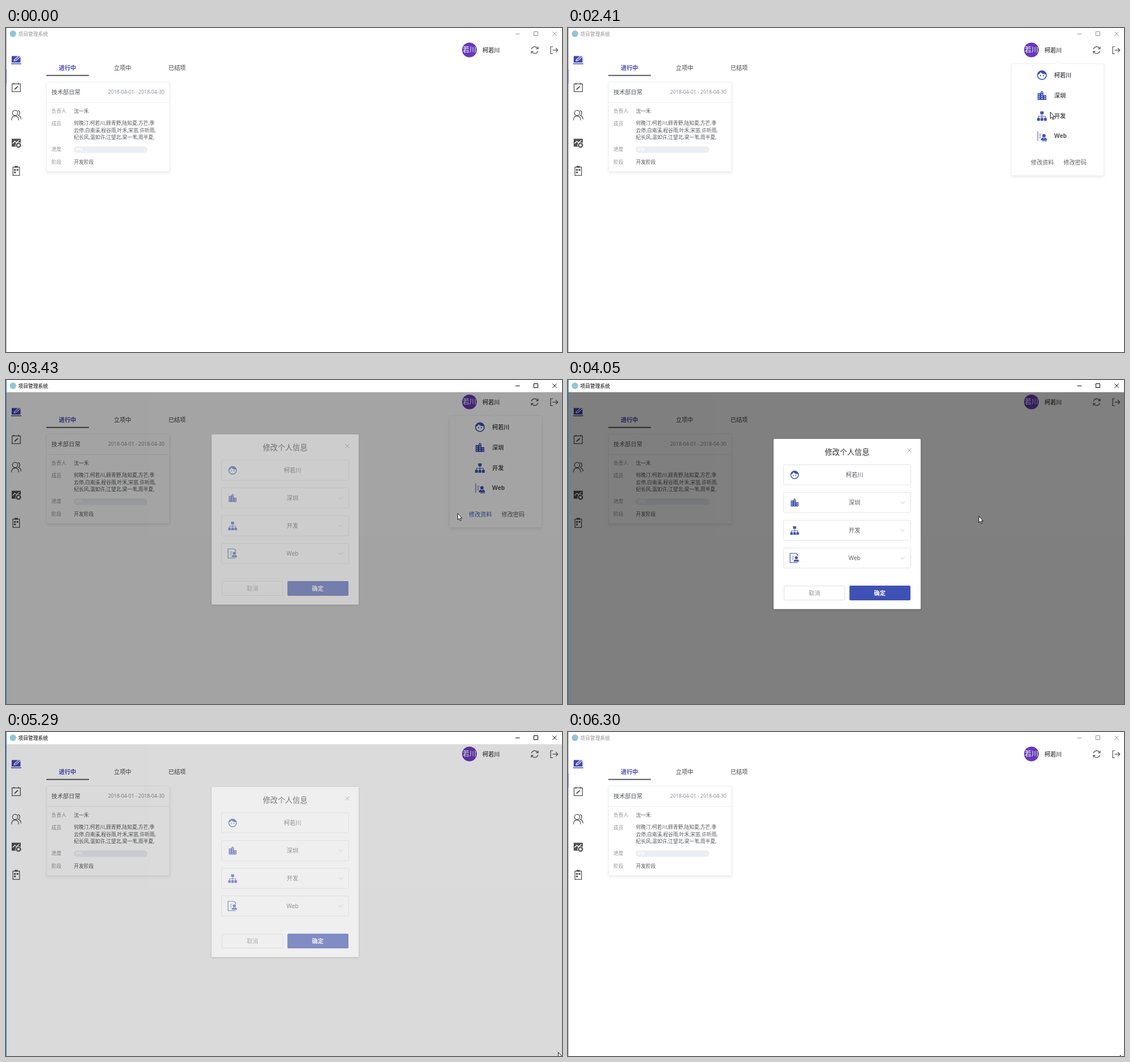
An HTML page for the animation above (6.77 s loop, 979 px wide and 572 px high).

```html
<!DOCTYPE html>
<html lang="zh-CN">
<head>
<meta charset="utf-8">
<title>项目管理系统</title>
<style>
html, body { margin: 0; width: 100%; height: 100%; overflow: hidden; background: #fff; }
svg { display: block; }
text { font: 8.75px 'Open Sans', 'Noto Sans CJK SC', 'Noto Sans CJK', sans-serif; fill: #55575b; }
.md { font-size: 10.2px; }
.lg { font-size: 13.1px; fill: #303133; }
.b { font-weight: 700; }
.mid { text-anchor: middle; }
.label { fill: #909399; }
.line { fill: none; stroke: currentColor; }
.card { fill: #fff; stroke: #eef0f4; filter: drop-shadow(.5px 2px 2px rgba(0,0,0,.08)); }
.box { fill: none; stroke: #e1e4ea; }
.blue { color: #3f51b5; fill: #3f51b5; }
.dark { color: #505053; }

/* One loop; values hold between keyframes unless a keyframe sets steps() */
.anim { animation: 6.77s step-end -5ms infinite; }
#bar { animation-name: bar; }
#edge { animation-name: edge; }
#name { animation-name: name; }
#hover { animation-name: hover; }
#popup { animation-name: popup; }
#link { animation-name: link; }
#veil { animation-name: veil; }
#dialog { animation-name: dialog; }
#cursor { animation-name: move; }
#arrow { animation-name: arrow; }
#hand { animation-name: hand; }

@keyframes bar { 0%, 93.058% { color: #939393; } 42.688% { color: #000; } }
@keyframes edge { 0%, 93.058% { opacity: 0; } 42.688% { opacity: 1; } }
@keyframes name { 0%, 27.474% { fill: #58595c; } 13.589% { fill: #3f51b5; } }
@keyframes hover { 0%, 27.474% { opacity: 0; } 13.589% { opacity: 1; } }
@keyframes link { 0%, 56.573% { fill: #606266; } 39.143% { fill: #4a5fc4; } }
@keyframes popup {
  0%, 56.573%, 100% { opacity: 0; }
  14.771% { opacity: .35; }
  15.805% { opacity: .75; }
  16.987% { opacity: 1; }
  54.21% { opacity: .8; }
  55.539% { opacity: .35; }
}
@keyframes veil {
  0%, 80.502%, 100% { opacity: 0; }
  50.665% { opacity: .36; }
  51.994% { opacity: .48; }
  53.176% { opacity: .5; }
  78.139% { opacity: .145; }
  79.468% { opacity: .02; }
}
@keyframes dialog {
  0%, 81.684%, 100% { opacity: 0; transform: translateY(-20px); }
  50.665% { opacity: .46; transform: translateY(-8px); }
  51.994% { opacity: .88; transform: translateY(-2.2px); }
  53.176% { opacity: .99; transform: translateY(-.3px); }
  54.21% { opacity: 1; transform: none; }
  78.139% { opacity: .57; transform: translateY(-7px); }
  79.468% { opacity: .17; transform: translateY(-16.6px); }
  80.502% { opacity: .04; transform: translateY(-19px); }
}
@keyframes move {
  0% { transform: translate(990px, 590px); }
  3.397% { transform: translate(893px, 560px); animation-timing-function: steps(2); }
  5.65% { transform: translate(775px, 440px); animation-timing-function: steps(2); }
  7.903% { transform: translate(704px, 270px); animation-timing-function: steps(2); }
  10.155% { transform: translate(735px, 130px); animation-timing-function: steps(2); }
  12.408% { transform: translate(803px, 62px); }
  13.589% { transform: translate(847px, 45px); }
  14.771% { transform: translate(859px, 42px); }
  15.805% { transform: translate(866px, 41px); }
  27.474% { transform: translate(864px, 60px); animation-timing-function: steps(2); }
  29.69% { transform: translate(855px, 120px); }
  35.598% { transform: translate(849px, 148px); animation-timing-function: steps(3); }
  39.143% { transform: translate(821px, 233px); }
  48.301% { transform: translate(817px, 233px); }
  49.631% { transform: translate(811px, 233px); }
  50.665% { transform: translate(795px, 235px); animation-timing-function: steps(5); }
  56.573% { transform: translate(733px, 240px); }
  58.641% { transform: translate(727px, 240px); }
  59.823% { transform: translate(723px, 240px); }
  63.22% { transform: translate(726px, 246px); animation-timing-function: steps(8); }
  72.23% { transform: translate(832px, 417px); }
  76.809% { transform: translate(905px, 495px); }
  78.139% { transform: translate(972px, 565px); }
  83.752% { transform: translate(972px, 568px); }
  84.934%, 100% { transform: translate(972px, 570px); }
}
@keyframes arrow { 0%, 27.474%, 42.688% { opacity: 1; } 13.589%, 39.143% { opacity: 0; } 100% { opacity: 1; } }
@keyframes hand { 0%, 27.474%, 42.688% { opacity: 0; } 13.589%, 39.143% { opacity: 1; } 100% { opacity: 0; } }
</style>
</head>
<body>
<svg width="979" height="572" viewBox="0 0 979 572">
  <defs>
    <g id="face" transform="scale(.85) translate(-12 -12)">
      <path fill-rule="evenodd" d="M12 2a10 10 0 1 0 0 20a10 10 0 1 0 0-20zm0 18c-4.41 0-8-3.59-8-8 0-.29.02-.58.05-.86 2.36-1.05 4.23-2.98 5.21-5.37C11.07 8.33 14.05 10 17.42 10c.78 0 1.53-.09 2.25-.26.21.71.33 1.47.33 2.26 0 4.41-3.59 8-8 8z"/>
      <circle cx="9" cy="13" r="1.25"/><circle cx="15" cy="13" r="1.25"/>
    </g>
    <path id="city" transform="scale(.85) translate(-12 -12)" d="M15 11V5l-3-3-3 3v2H3v14h18V11h-6zm-8 8H5v-2h2v2zm0-4H5v-2h2v2zm0-4H5V9h2v2zm6 8h-2v-2h2v2zm0-4h-2v-2h2v2zm0-4h-2V9h2v2zm0-4h-2V5h2v2zm6 12h-2v-2h2v2zm0-4h-2v-2h2v2z"/>
    <g id="tree">
      <path d="M-3-8h6v5h-6zM-8.5 3.500h5v5h-5zM-2.500 3.500h5v5h-5zM3.500 3.500h5v5h-5z"/>
      <path class="line" d="M0-3V4M-6 4V.5H6V4"/>
    </g>
    <g id="person">
      <circle cx="3.500" cy="-.8" r="3"/>
      <path d="M-2 7.200C-2 4 0 3 2 2.600L3.500 4.500 5 2.600C7 3 9 4 9 7.200z"/>
      <path class="line" stroke-width=".9" d="M-5-3.500h4M-5-.5h3.500M-5 2.500h3"/>
    </g>
    <path id="chev" class="line" d="M-3.800-2L0 1.800 3.800-2"/>
  </defs>

  <rect width="979" height="572" fill="#fff"/>

  <!-- Sidebar -->
  <g style="color:#4347b0;fill:#4347b0">
    <path d="M10 49.500h15.500V61H10zM9 62.500h18V64H9z"/>
    <path d="M13.500 59l1-3.600 8.500-7.400 3 2.800-8.500 7.200z" fill="#fff"/>
    <path d="M15 57.700l.7-1.800 7.600-6.700 1.300 1.300-7.600 6.500z"/>
  </g>
  <g class="dark line" stroke-width="1.250">
    <path d="M10.700 98.700h14.600v13.600H10.700zM14 96.500v3.500M22 96.500v3.500"/>
    <path d="M15 108.500l6-5.500" stroke-width="1.700"/>
    <circle cx="16" cy="150" r="4.600"/>
    <path d="M9.700 163c0-5 2.500-7.600 6.300-7.600s6.300 2.600 6.300 7.600M20.500 145.800c4.500.2 5.200 6 1.300 8.400 3 1.200 4.500 3.800 4.700 7"/>
    <path d="M12.200 245.700h11.600v14.600H12.200z"/>
  </g>
  <g fill="#505053">
    <path d="M10 195.500h16v14H10z"/>
    <path d="M11.500 204l4-4 3 2.500 5-4.500" fill="none" stroke="#fff" stroke-width="1.300"/>
    <circle cx="22" cy="207" r="5.500" fill="#fff"/>
    <circle cx="22" cy="207" r="3.200" fill="none" stroke="#505053" stroke-width="1.800"/>
    <circle cx="22" cy="207" r="4.400" fill="none" stroke="#505053" stroke-dasharray="1.800 1.650"/>
    <path d="M15 243.500h6v3h-6zM14.200 249h3v3h-3zM18.700 249h3v3h-3zM14.200 253.500h3v3h-3z"/>
  </g>

  <!-- Tabs -->
  <text class="md b" x="93" y="73.700" style="fill:#4347b0">进行中</text>
  <text class="md" x="190" y="73.700" style="fill:#404145">立项中</text>
  <text class="md" x="286" y="73.700" style="fill:#404145">已结项</text>
  <path fill="#58595c" d="M71 82.700h75v2H71z"/>

  <!-- Project card -->
  <rect class="card" x="71.500" y="95.500" width="216.500" height="158" rx="1.500"/>
  <path stroke="#ebeef5" d="M72 131.500h216"/>
  <text class="md" x="80" y="116.500">技术部日常</text>
  <text x="279" y="115.500" text-anchor="end" style="font-size:8.800px;fill:#85888d">2018-04-01 - 2018-04-30</text>
  <g>
    <text class="label" x="80" y="150.300">负责人</text><text x="119.500" y="150.300">沈一禾</text>
    <text class="label" x="80" y="172.300">成员</text>
    <text x="119.500" y="171.300">何晚汀,柯若川,顾青野,陆知夏,方芒,季</text>
    <text x="119.500" y="183.500">云停,白南溪,程谷雨,叶禾,宋苗,许听雨,</text>
    <text x="119.500" y="195.700">纪长风,温如许,江望北,梁一苇,周半夏,</text>
    <text class="label" x="80" y="217.300">进度</text>
    <rect x="119" y="209" width="130" height="11.500" rx="5.750" fill="#ebeef5"/>
    <text class="b" x="122.500" y="217.300" style="fill:#fff">0%</text>
    <text class="label" x="80" y="239.700">阶段</text><text x="119.500" y="239.700">开发阶段</text>
  </g>

  <!-- User header -->
  <rect id="hover" class="anim" x="830" y="25" width="53" height="28" fill="#fcfcfd"/>
  <circle cx="816" cy="38.800" r="13" fill="#673ab7"/>
  <text class="mid" x="816" y="43.200" style="font-size:12px;fill:#fff">若川</text>
  <text id="name" class="md b anim" x="839" y="42.800">柯若川</text>
  <g class="dark line" stroke-width="1.200">
    <path d="M925.300 37.500a6 6 0 0 1 11-1.300M936.700 40.500a6 6 0 0 1-11 1.300"/>
    <path d="M937 33v3.600h-3.600M925 45v-3.600h3.600"/>
    <path d="M963 33h-4v12.500h4M962.500 39.200h9M968 35.500l3.700 3.700-3.700 3.700"/>
  </g>

  <!-- Profile popover -->
  <g id="popup" class="anim">
    <rect class="card" x="781" y="63" width="162.500" height="197.500" rx="2"/>
    <path d="M857.500 63.500l4.500-4.500 4.500 4.500" fill="#fff" stroke="#eef0f4"/>
    <g class="blue">
      <use href="#face" x="834.500" y="83.300"/>
      <use href="#city" x="834.500" y="119.300"/>
      <use href="#tree" x="834.500" y="155.300"/>
      <use href="#person" x="834.500" y="191"/>
      <path class="line" d="M827 182.500v17M835 199.500h8"/>
    </g>
    <text class="md b" x="856" y="87">柯若川</text>
    <text class="md b" x="856" y="122.800">深圳</text>
    <text class="md b" x="856" y="158.700">开发</text>
    <text class="md b" x="856" y="194">Web</text>
    <text id="link" class="md anim" x="815" y="240.800">修改资料</text>
    <text class="md" x="872.500" y="240.800" style="fill:#606266">修改密码</text>
  </g>

  <rect id="veil" class="anim" x="1" y="21.500" width="978" height="551"/>

  <!-- Edit dialog -->
  <g id="dialog" class="anim">
    <rect x="362" y="104" width="259" height="300.500" rx="1.500" fill="#fff" style="filter:drop-shadow(0 1px 1.500px rgba(0,0,0,.3))"/>
    <text class="lg mid" x="491.500" y="131.700">修改个人信息</text>
    <path class="line" style="color:#909399" d="M597.500 121l7 7M604.500 121l-7 7"/>
    <rect class="box" x="379.500" y="149.500" width="224" height="35.500" rx="2"/>
    <rect class="box" x="379.500" y="198.500" width="224" height="35.500" rx="2"/>
    <rect class="box" x="379.500" y="247.500" width="224" height="35.500" rx="2"/>
    <rect class="box" x="379.500" y="296.500" width="224" height="35.500" rx="2"/>
    <g class="blue">
      <use href="#face" transform="translate(399 167.500) scale(.88)"/>
      <use href="#city" transform="translate(399 216.500) scale(.88)"/>
      <use href="#tree" transform="translate(399 265.500) scale(.9)"/>
      <use href="#person" transform="translate(399 314.500) scale(.88)"/>
      <path class="line" stroke-width="1.200" d="M404.500 311v-2.500l-3-2.500h-10.500v16.500h13.500"/>
    </g>
    <text class="md mid" x="504.500" y="171.300">柯若川</text>
    <text class="md mid" x="504.500" y="220.200">深圳</text>
    <text class="md mid" x="504.500" y="269.200">开发</text>
    <text class="md mid" x="504.500" y="317.800">Web</text>
    <g style="color:#c0c4cc">
      <use href="#chev" x="589" y="216.500"/>
      <use href="#chev" x="589" y="265.500"/>
      <use href="#chev" x="589" y="314.500"/>
    </g>
    <rect class="box" x="380.500" y="363.500" width="107" height="25" rx="2" style="stroke:#dcdfe6"/>
    <rect x="495.500" y="363" width="107.500" height="26" rx="2" fill="#3f51b5"/>
    <text class="md mid label" x="434" y="379.900">取消</text>
    <text class="md mid b" x="549" y="379.900" style="fill:#fff">确定</text>
  </g>

  <!-- Window frame -->
  <path fill="#a6a6a6" d="M0 0h1v572H0z"/>
  <path fill="#5a5ec8" d="M0 73h1v25H0z"/>
  <path id="edge" class="anim" fill="#1f7cc4" d="M0 0h1v572H0z"/>
  <circle cx="12.200" cy="10.300" r="5.700" fill="#92c5d8"/>
  <g id="bar" class="anim">
    <text x="21.500" y="13.600" style="fill:currentColor">项目管理系统</text>
    <path class="line" d="M897 10.500h7.500M929.500 6.500h7v7h-7zM962.300 6.500l7.400 7.400M969.700 6.500l-7.400 7.400"/>
  </g>

  <g id="cursor" class="anim" fill="#fff" stroke="#000" stroke-width=".9" stroke-linejoin="round">
    <path id="arrow" class="anim" d="M.4.5V11.800L2.900 9.500 4.600 13.600 6.400 12.800 4.700 8.800H8z"/>
    <path id="hand" class="anim" d="M-1.300 1.200C-1.300-.2 1.100-.2 1.100 1.200V6C2 5.300 3.200 5.700 3.300 6.600 4.200 6 5.200 6.400 5.300 7.300 6.300 6.900 7 7.500 7 8.500V12.500L5.800 15.500V17.500H-1.300V15.800L-4.700 10.700C-5.300 9.300-3.700 8.500-2.800 9.500L-1.300 11z"/>
  </g>
</svg>
</body>
</html>
```
